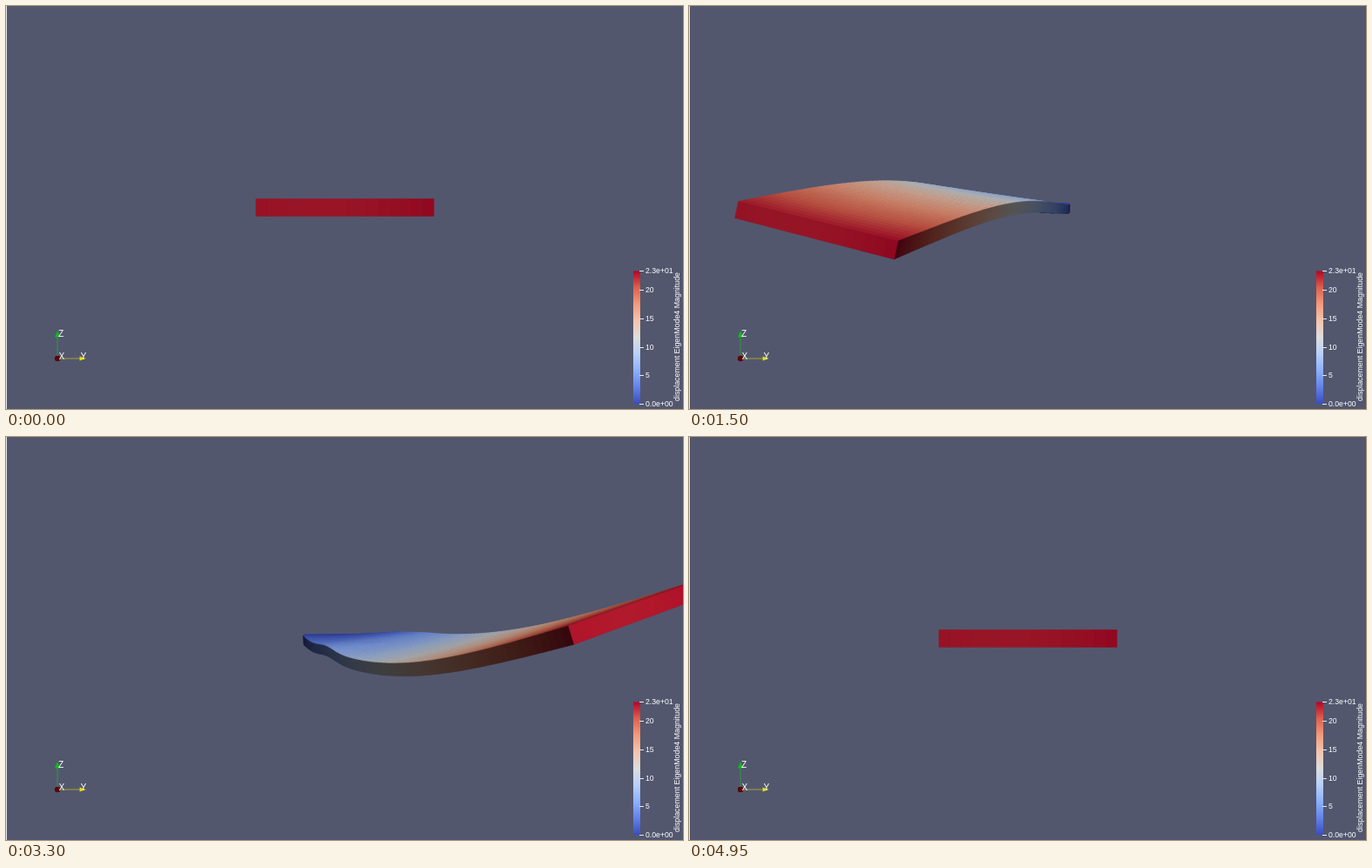
An HTML page with a canvas for the animation above (5000 ms loop, 776 px wide and 463 px high).

```html
<!DOCTYPE html>
<html>
<head>
<meta charset="utf-8">
<style>
html, body { margin: 0; width: 100%; height: 100%; overflow: hidden; background: #52576e; }
canvas { display: block; }
</style>
</head>
<body>
<canvas id="stage" width="776" height="463"></canvas>
<script>
const ctx = document.getElementById('stage').getContext('2d');
const FRAME_MS = 50, FRAMES = 100, CYCLES = 2;
const CX = 388.5, CY = 231.5;           // screen centre of the plate
const CAMERA = 812, LENGTH = 969;       // camera to tip, tip to clamp
const HALF_W = 102, HALF_T = 10;
const SWAY = 399, LIFT = 40, TWIST = 0.351, MAX_MOVE = 413;
const STEPS = 90, COLS = 16;

const COOL_WARM = [
  [59, 76, 192], [98, 130, 234], [141, 176, 254], [184, 208, 249], [221, 221, 221],
  [245, 196, 173], [244, 154, 123], [222, 96, 77], [180, 4, 38]
];

function coolWarm(v, shade = 1) {
  const p = Math.min(Math.max(v, 0), 1) * 8, i = Math.min(Math.floor(p), 7);
  const rgb = COOL_WARM[i].map((c, k) => Math.round(shade * (c + (COOL_WARM[i + 1][k] - c) * (p - i))));
  return `rgb(${rgb})`;
}

// Cantilever bending mode, scaled to 1 at the tip
function bending(x, beta, sigma, sign) {
  const b = beta * x;
  return sign * (Math.cosh(b) - Math.cos(b) - sigma * (Math.sinh(b) - Math.sin(b))) / 2;
}
const ripple = x => Math.exp(-(((x - 0.36) / 0.07) ** 2));
const sway = x => SWAY * bending(x, 1.8751, 0.7341, 1);
const swaySlope = x => (sway(x + 0.001) - sway(x - 0.001)) / 0.002 / LENGTH;
const lift = x => LIFT * bending(x ** 1.3, 4.6941, 1.01847, -1) + 5 * ripple(x);
const twist = x => TWIST * Math.sin(x * Math.PI / 2) - 0.035 * ripple(x);

const sections = Array.from({ length: STEPS + 1 }, (_, i) => {
  const x = i / STEPS;
  return { x, sway: sway(x), slope: swaySlope(x), lift: lift(x), twist: twist(x) };
});

// Axes: towards the camera, right, up
function node(i, y, z, s) {
  const q = sections[i];
  const move = [-q.slope * y, q.sway - q.twist * z, q.lift + q.twist * y];
  return {
    pos: [LENGTH * (q.x - 1) + s * move[0], y + s * move[1], z + s * move[2]],
    value: Math.hypot(...move) / MAX_MOVE
  };
}

const sub = (a, b) => a.map((v, k) => v - b[k]);
const dot = (a, b) => a[0] * b[0] + a[1] * b[1] + a[2] * b[2];
const cross = (a, b) => [a[1] * b[2] - a[2] * b[1], a[2] * b[0] - a[0] * b[2], a[0] * b[1] - a[1] * b[0]];
const KEY_LIGHT = [0.6, 0.13, 0.77];

function project([x, y, z]) {
  const k = CAMERA / (CAMERA - x);
  return [CX + y * k, CY - z * k];
}

function plateQuads(s) {
  const quads = [];
  function add(nodes, fixedShade) {
    const p = nodes.map(n => n.pos);
    const normal = cross(sub(p[2], p[0]), sub(p[3], p[1]));
    const mid = [0, 1, 2].map(k => (p[0][k] + p[1][k] + p[2][k] + p[3][k]) / 4);
    const view = sub([CAMERA, 0, 0], mid);
    if (dot(normal, view) <= 0) return;
    const light = dot(normal, KEY_LIGHT) / Math.hypot(...normal);
    const shade = fixedShade || 0.28 + 0.62 * Math.max(0, light);
    const value = nodes.reduce((sum, n) => sum + n.value, 0) / 4;
    quads.push({ points: p.map(project), color: coolWarm(value, shade), depth: Math.hypot(...view) });
  }
  const colY = j => HALF_W * (2 * j / COLS - 1);
  for (let i = 0; i < STEPS; i++) {
    for (let j = 0; j < COLS; j++) {
      const a = colY(j), b = colY(j + 1);
      add([node(i, a, HALF_T, s), node(i + 1, a, HALF_T, s), node(i + 1, b, HALF_T, s), node(i, b, HALF_T, s)]);
      add([node(i, a, -HALF_T, s), node(i, b, -HALF_T, s), node(i + 1, b, -HALF_T, s), node(i + 1, a, -HALF_T, s)]);
    }
    for (const side of [-1, 1]) {
      const y = side * HALF_W, z = side * HALF_T;
      add([node(i, y, -z, s), node(i, y, z, s), node(i + 1, y, z, s), node(i + 1, y, -z, s)]);
    }
  }
  quads.sort((a, b) => b.depth - a.depth);
  const tipShade = 0.8 + 0.05 * Math.min(1, Math.abs(s) * 5) + 0.1 * s;
  for (let j = 0; j < COLS; j++) {
    const a = colY(j), b = colY(j + 1);
    add([node(STEPS, a, -HALF_T, s), node(STEPS, b, -HALF_T, s),
         node(STEPS, b, HALF_T, s), node(STEPS, a, HALF_T, s)], tipShade);
  }
  return quads;
}

function polygon(points, color, seam) {
  ctx.beginPath();
  points.forEach(([x, y]) => ctx.lineTo(x, y));
  ctx.closePath();
  ctx.fillStyle = color;
  ctx.fill();
  if (seam) {
    ctx.strokeStyle = color;
    ctx.lineWidth = 0.5;
    ctx.lineJoin = 'round';
    ctx.stroke();
  }
}

function rect(x, y, w, h, color) {
  ctx.fillStyle = color;
  ctx.fillRect(x, y, w, h);
}

function label(text, x, y, size) {
  ctx.font = `${size}px "Liberation Sans", Arial, sans-serif`;
  ctx.fillStyle = '#fff';
  ctx.fillText(text, x, y);
}

function drawAxes() {
  rect(58.5, 380, 1, 23, '#2f9a45');
  polygon([[59, 373], [62, 380.5], [56, 380.5]], '#0ac012');
  rect(61, 404.5, 24, 1, '#a5a52c');
  polygon([[91.5, 405], [84.5, 402.5], [84.5, 407.5]], '#e0e00a');
  ctx.beginPath();
  ctx.arc(59, 405, 3.2, 0, 7);
  ctx.fillStyle = '#5c0508';
  ctx.fill();
  label('X', 60.5, 405.5, 10);
  label('Y', 85.5, 405.5, 10);
  label('Z', 60, 380, 10);
}

function drawLegend() {
  const top = 304.5, bottom = 457;
  const ramp = ctx.createLinearGradient(0, bottom, 0, top);
  COOL_WARM.forEach((_, i) => ramp.addColorStop(i / 8, coolWarm(i / 8)));
  rect(719, top, 8, bottom - top, ramp);
  const ticks = [['0.0e+00', 457], ['5', 424], ['10', 391.5], ['15', 358.5], ['20', 326], ['2.3e+01', 304]];
  for (const [text, y] of ticks) {
    rect(726, Math.round(y), 5, 1, '#e8e8ee');
    label(text, 733, y + 3, 8.7);
  }
  ctx.save();
  ctx.translate(772, 454);
  ctx.rotate(-Math.PI / 2);
  label('displacement EigenMode4 Magnitude', 0, 0, 8.85);
  ctx.restore();
}

let shown = -1;
function draw() {
  requestAnimationFrame(draw);
  const frame = Math.floor(performance.now() / FRAME_MS) % FRAMES;
  if (frame === shown) return;
  shown = frame;
  const s = Math.sin(2 * Math.PI * CYCLES * frame / (FRAMES - 1));
  rect(0, 0, 776, 463, '#52576e');
  rect(0, 0, 1, 463, '#e4e5e9');
  for (const q of plateQuads(s)) polygon(q.points, q.color, true);
  drawAxes();
  drawLegend();
}
draw();
</script>
</body>
</html>
```
